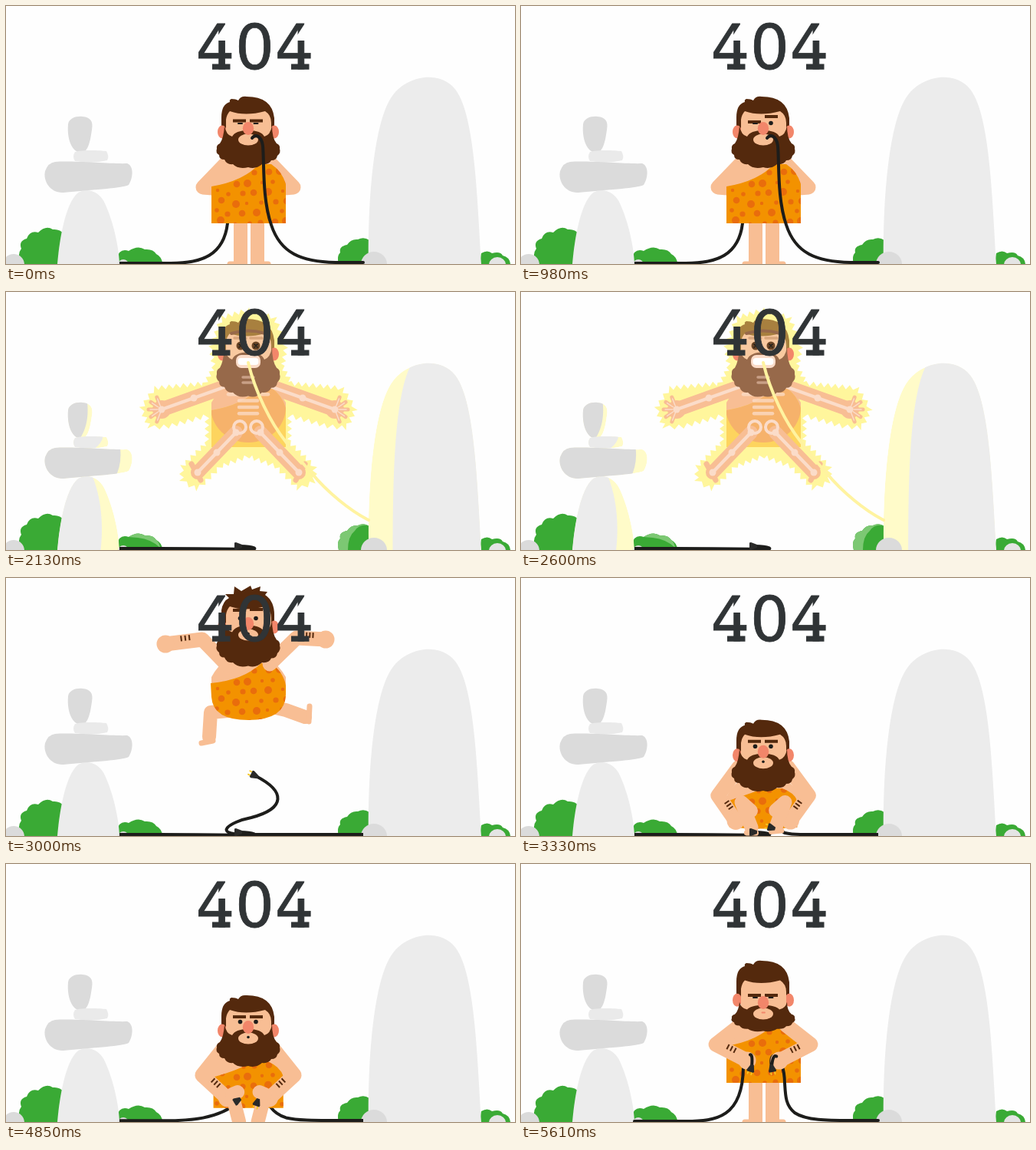
Animation of 664 by 336 pixels, one loop 5720 ms. Source, as an HTML page with a canvas:

```html
<!DOCTYPE html>
<html lang="en">
<head>
<meta charset="utf-8">
<title>404</title>
<style>
  html, body { margin: 0; width: 100%; height: 100%; overflow: hidden; background: #fefefe; }
  canvas, svg { position: absolute; left: 0; top: 0; width: 664px; height: 336px; }
  text { font: 80px "DejaVu Sans", sans-serif; letter-spacing: .7px; }
</style>
</head>
<body>
<canvas width="664" height="336"></canvas>
<svg viewBox="0 0 664 336" fill="#303436">
  <clipPath id="open4">
    <path clip-rule="evenodd" d="M0 0H664V120H0ZM286.500 23H296V45H272.200ZM389.700 23H399V45H375.400Z"/>
  </clipPath>
  <text x="247.500" y="82.400" stroke="#303436" stroke-width=".8" clip-path="url(#open4)">404</text>
  <path d="M269 75.500H292.500V82.800H269ZM372 75.500H395.500V82.800H372Z"/>
</svg>
<script>
const LOOP = 5720;
const ctx = document.querySelector('canvas').getContext('2d');
const SKIN = '#f8be94', HAIR = '#54290d', CORAL = '#f2866a', ORANGE = '#f39200',
      SPOT = '#e96d0c', INK = '#1d1d1b', GLOW = '#fff69c', LIT = '#fffbc9',
      BONE = '#fbdcc9', PALE = '#ececec', GREY = '#dbdbdb', GREEN = '#3aaa35', LEAF = '#7cc873';

// path helpers; every moving path uses absolute coordinate pairs
const pairs = (d, f) => d.replace(/(-?[\d.]+) (-?[\d.]+)/g, (_, x, y) => f(+x, +y).join(' '));
const move = (d, dy) => pairs(d, (x, y) => [x, y + dy]);
const mirror = d => pairs(d, (x, y) => [632 - x, y]);
const points = d => d.match(/-?[\d.]+/g).map(Number);

function mix(a, b, k) {
  if (typeof a === 'number') return a + (b - a) * k;
  const nb = points(b);
  let i = 0;
  return a.replace(/-?[\d.]+/g, n => (+n + (nb[i++] - n) * k).toFixed(2));
}
function span(keys, t) {
  let i = 0;
  while (i < keys.length - 2 && t >= keys[i + 1][0]) i++;
  const [t0, a] = keys[i], [t1, b] = keys[i + 1];
  const k = Math.min(1, Math.max(0, (t - t0) / (t1 - t0)));
  return [a, b, k * k * (3 - 2 * k)];
}
const track = (keys, t) => mix(...span(keys, t));

function fill(d, color) { ctx.fillStyle = color; ctx.fill(new Path2D(d)); }
function line(d, w, color, cap = 'round') {
  ctx.lineWidth = w; ctx.strokeStyle = color; ctx.lineCap = cap; ctx.lineJoin = 'round';
  ctx.stroke(new Path2D(d));
}
function oval(x, y, rx, color, ry = rx) {
  ctx.fillStyle = color; ctx.beginPath(); ctx.ellipse(x, y, rx, ry, 0, 0, 7); ctx.fill();
}
function layer(f) { ctx.save(); f(); ctx.restore(); }

// poses
const TUNIC = 'M268 235Q310 228 330 206L346 206Q360 215 365 232L365 283Q340 283 316 283Q292 283 268 283Z';
const TORSO = 'M268 242L268 225Q284 195 316 195Q348 195 365 225L365 242Z';
function pose(p) {
  return { face: 0, beard: 1, ...p,
    armR: p.armR || mirror(p.armL), legR: p.legR || mirror(p.legL), footR: p.footR || mirror(p.footL) };
}
const LEGS = { legL: 'M306 270L306 300L306 340', footL: 'M311 336L292 336',
  legR: 'M328 270L328 300L328 340', footR: 'M323 336L342 336' };
const stand = pose({ head: 0, body: 0, tunic: TUNIC, armL: 'M286 206L257 236L282 238', ...LEGS });
const shock = pose({ head: -83, body: -81, beard: 1.19, tunic: move(TUNIC, -81),
  armL: 'M290 122L245 138L203 153', legL: 'M300 183L275 209L250 235', footL: 'M242 224L254 245' });
const jump = pose({ head: -100, body: -96, beard: 1.1,
  tunic: 'M267 137Q310 133 333 111L345 111Q362 122 365 140L365 152Q364 185 316 185Q270 185 268 155Z',
  armL: 'M290 115L256 80L208 86', armR: 'M344 112L379 78L417 80',
  legL: 'M300 172L267 175L265 207', footL: 'M270 212L255 215',
  legR: 'M335 165L365 172L390 181', footR: 'M396 167L395 187' });
const sit = pose({ head: 78, body: 70,
  tunic: 'M272 300Q300 290 316 285L340 285Q356 290 360 300L360 336Q340 336 316 336Q292 336 272 336Z',
  armL: 'M284 255L257 297L285 332', legL: 'M300 312L289 300L303 333', footL: 'M296 340L310 340' });
const lift = pose({ head: 8, body: 2, tunic: move(TUNIC, 2), armL: 'M286 210L254 235L295 256', ...LEGS });
const hold = { ...lift, face: 13, beard: .7 };

const POSES = [[0, stand], [1040, stand], [1130, shock], [2630, shock], [2960, jump], [3060, jump],
  [3380, sit], [4710, sit], [5060, lift], [5310, lift], [5590, hold], [LOOP, hold]];

const GROUND_L = 'M148 334L200 334C230 334 270 334 310 335C336 336 322 331 305 331';
const HOLD_L = 'M148 335L215 335C255 335 289 330 290 265C291 246 309 240 301 264';
const STAND_L = 'M148 335L215 335C255 335 284 325 289 283C290 275 290 270 290 262';
const FLY_L = 'M148 334L240 334C290 334 306 315 305 268C304 250 303 238 302.500 228';
const CORD_L = [[0, STAND_L], [1040, STAND_L], [1460, FLY_L], [1540, FLY_L], [2050, GROUND_L],
  [4710, GROUND_L], [5060, HOLD_L], [LOOP, HOLD_L]];

const STAND_R = 'M466 334L430 334C385 333 358 322 346 285C334 250 337 205 335 182C333 168 325 167 321 172';
const SHOCK_R = 'M473 297L471 296C450 285 420 262 398 235C380 215 368 200 365 195C345 170 325 130 316 92';
const WHIP_R = 'M466 334L430 334C380 334 345 334 310 334C270 334 290 318 320 312C365 300 365 278 326 258';
const GROUND_R = 'M466 334L430 334C400 334 385 334 370 334C360 334 352 334 346 334C340 334 336 334 329 333';
const HOLD_R = 'M466 334L430 334C400 334 372 334 357 324C345 314 345 302 344 285C343 245 322 240 327 264';
const CORD_R = [[0, STAND_R], [1040, STAND_R], [1130, SHOCK_R], [2630, SHOCK_R], [2960, WHIP_R],
  [3040, WHIP_R], [3400, GROUND_R], [4710, GROUND_R], [5060, HOLD_R], [LOOP, HOLD_R]];

// scenery: outline, colour, part that stays in shade while lit
const ROCKS = [
  ['M81 154C82 146 92 143 100 144C110 145 114 150 112 161C110 176 107 190 99 191C89 192 79 178 81 154Z', GREY,
    'M70 140L107 140C110 160 107 180 95 195L70 195Z'],
  ['M90 190C100 187 122 188 131 189Q135 196 132 201Q112 206 90 202Q86 196 90 190Z', '#eaeaea',
    'M80 185L128 185Q129 195 116 205L80 205Z'],
  ['M67 336C70 300 78 258 93 244C104 236 120 240 128 255C138 275 147 310 148 336Z', PALE,
    'M50 230L110 230C122 255 130 290 125 336L50 336Z'],
  ['M64 203C85 201 140 206 158 205C167 208 166 224 160 233C150 238 100 240 75 243C58 244 48 228 51 215Q55 204 64 203Z', GREY,
    'M40 200L150 200Q154 225 142 245L40 245Z'],
  ['M473 336C472 250 480 150 504 117C522 92 560 84 582 104C610 130 614 230 620 336Z', PALE,
    'M506 336C506 240 508 125 533 90L640 90L640 336Z']
];
const BUSHES = [
  'M18 336Q15 322 20 316Q16 306 27 303Q31 292 42 295Q52 285 61 291Q70 290 76 297L76 336Z',
  'M140 336L148 321Q153 316 160 319Q172 311 181 317Q192 316 196 323Q204 327 204 336Z',
  'M434 336Q431 326 436 321Q434 313 445 311Q450 303 459 304Q467 300 474 305L474 336Z',
  'M618 336L620 322Q628 317 634 322Q645 319 648 325Q657 327 658 336Z'
];

function scenery(lit, t) {
  BUSHES.forEach(d => fill(d, GREEN));
  if (lit) {
    fill('M160 319Q172 311 181 317Q192 316 196 323Q200 326 201 333Q190 322 172 320Z', LEAF);
    fill(BUSHES[2], LEAF);
    fill('M446 336Q446 318 455 311Q462 301 474 305L474 336Z', GREEN);
  }
  for (const [d, color, shade] of ROCKS) {
    if (!lit) { fill(d, color); continue; }
    layer(() => {
      ctx.clip(new Path2D(d));
      fill(d, LIT);
      ctx.translate(1.5 * Math.sin(t / 90), 0);
      fill(shade, color);
    });
  }
  oval(10, 337, 14, GREY);
  oval(153, 337, 7, GREY);
  oval(480, 336, 17, GREY, 16);
  oval(641, 337, 11, '#e4e4e4', 10);
}

// zigzag halo around the raised figure
const HALF = [[316, 24], [350, 34], [364, 72], [360, 98], [372, 120], [438, 126], [455, 152], [444, 176],
  [420, 174], [369, 160], [369, 196], [402, 228], [402, 246], [382, 256], [352, 226], [316, 213]];
const OUTLINE = HALF.concat(HALF.slice(1, -1).reverse().map(([x, y]) => [632 - x, y]));
function halo(flip) {
  ctx.beginPath();
  OUTLINE.forEach(([x, y], i) => {
    const [nx, ny] = OUTLINE[(i + 1) % OUTLINE.length];
    const len = Math.hypot(nx - x, ny - y), n = 2 * Math.max(1, Math.round(len / 10));
    for (let j = 0; j < n; j++) {
      const k = j / n, out = (j + flip) % 2 ? 4 : -2;
      ctx.lineTo(x + (nx - x) * k + (ny - y) / len * out, y + (ny - y) * k - (nx - x) / len * out);
    }
  });
  ctx.fillStyle = GLOW;
  ctx.fill();
}

function bone(d) {
  line(d, 4.5, BONE);
  const p = points(d);
  for (let i = 0; i < p.length; i += 2) oval(p[i], p[i + 1], 4.5, BONE);
}
function skeleton(p) {
  [p.armL, p.armR, p.legL, p.legR].forEach(bone);
  layer(() => {
    ctx.globalAlpha = .75;
    for (let i = 0; i < 5; i++) {
      const w = i < 2 ? 26 : 12, y = 125 + 8.3 * i;
      line(`M${316 - w} ${y}L${316 + w} ${y}`, 4.5, BONE);
    }
  });
  for (const x of [305, 327]) {
    ctx.beginPath(); ctx.arc(x, 176, 8, 0, 7); ctx.lineWidth = 4; ctx.strokeStyle = BONE; ctx.stroke();
  }
}

function splayed(d, side) {
  const [x, y] = points(d).slice(-2);
  oval(x, y, 12, SKIN);
  for (let i = -2; i <= 2; i++) {
    const a = i * .6, dx = side * Math.cos(a), dy = Math.sin(a);
    line(`M${x} ${y}L${x + dx * 17} ${y + dy * 17}`, 5, SKIN);
    line(`M${x} ${y}L${x + dx * 15} ${y + dy * 15}`, 1.5, BONE);
  }
}

function bands(d) {
  const [, , ex, ey, hx, hy] = points(d);
  const len = Math.hypot(hx - ex, hy - ey), s = hx > ex ? 1 : -1;
  const nx = s * (hy - ey) / len, ny = -s * (hx - ex) / len;
  for (const k of [.34, .45, .56]) {
    const x = ex + (hx - ex) * k, y = ey + (hy - ey) * k;
    line(`M${x + nx} ${y + ny}L${x + nx * 8} ${y + ny * 8}`, 2, HAIR, 'butt');
  }
}

function tunic(p, lit) {
  fill(p.tunic, lit ? '#fdd45e' : ORANGE);
  layer(() => {
    ctx.clip(new Path2D(p.tunic));
    if (lit) return oval(316, 150, 49, '#f6b26b', 46);
    ctx.translate(0, p.body);
    for (let i = 0; i < 36; i++) {
      const r = i / 6 | 0, c = i % 6;
      oval(272 + c * 17 + (r % 2) * 8 + i * 7 % 5, 214 + r * 13 + i * 5 % 6, [5, 2.8, 4.3, 2.2, 3.6][(i * 3 + r) % 5], SPOT);
    }
  });
}

const MANE = 'M281 172L281 145Q281 128 292 125Q291 122 294 121Q300 121 303 123Q306 117 314 118Q347 118 350 146L350 172Z';
const SPIKES = 'M281 172L281 142Q283 130 291 126L286 121L297 121L298 111L307 117L319 110L321 115L332 111L331 117L341 118L338 122Q350 130 350 148L350 172Z';
const FACE = 'M287 185L287 148Q288 141 292 137Q312 144 338 137Q346 142 346 152L346 185Z';
const BEARD = 'M285 156Q284 172 279 179Q274 181 275 186Q273 191 278 194Q278 200 285 200Q288 207 296 206Q303 213 316 210Q326 213 334 206Q343 207 346 201Q353 201 354 195Q359 191 357 186Q358 181 353 179Q347 172 347 156Q345 168 337 170Q333 162 316 162Q299 162 295 170Q287 168 285 156Z';

function mood(t) {
  if (t >= 840 && t < 1060) return { browL: 151, browR: 144, eyeR: 1, mouth: 'bite' };
  if (t < 840) return { browL: 149.5, browR: 149.5, mouth: 'bite' };
  if (t < 3250) return { browL: 142, browR: 141, eyeL: 1, eyeR: 1, mouth: 'o' };
  if (t < 4900) {
    const look = t > 3940 && t < 4480;
    const open = !(look && t % 270 < 50);
    return { browL: 146, browR: 146, eyeL: open, eyeR: open, mouth: 'o',
      dx: look ? 2 * Math.sin((t - 3940) / 540 * Math.PI * 2) : 0 };
  }
  return { browL: 150, browR: 150, mouth: 'flat' };
}

function head(p, t, lit) {
  const m = mood(t);
  ctx.translate(0, p.head);
  const ear = 164 + p.face * .4;
  fill(t > 2640 && t < 3300 ? SPIKES : MANE, lit ? '#a8803f' : HAIR);
  oval(282, ear, 6, CORAL, 8.5);
  oval(350, ear, 6, CORAL, 8.5);
  fill(move(FACE, p.face * .5), lit ? '#f8c9a0' : SKIN);
  layer(() => {
    ctx.translate(0, 165 + p.face);
    ctx.scale(1, p.beard);
    ctx.translate(0, -165);
    fill(BEARD, lit ? '#97694a' : HAIR);
  });
  ctx.translate(0, p.face);
  if (lit) return;
  const chew = t > 240 && t < 800 ? Math.sin((t - 240) / 560 * Math.PI * 8) : 0;
  oval(316, 174 + chew, 13, SKIN, 7.5);
  line(`M296 ${m.browL}L313 ${m.browL}`, 4, HAIR, 'butt');
  line(`M318 ${m.browR}L335 ${m.browR}`, 4, HAIR, 'butt');
  for (const [x, open] of [[305.5, m.eyeL], [326, m.eyeR]]) {
    if (open) oval(x + (m.dx || 0), 152.5, 2.8, INK);
    else line(`M${x - 2.5} 153L${x + 2.5} 153`, 2, INK);
  }
  oval(316, 159.5 + chew * .5, 7.2, CORAL, 8.5);
  if (m.mouth === 'o') oval(316, 172.5, 1.8, INK);
  if (m.mouth === 'flat') line('M314.500 172.500L318 172.500', 1.8, CORAL);
}

function shockedFace() {
  line('M294 54Q316 47 338 54', 4, '#97694a');
  for (const x of [306, 326]) {
    oval(x, 70, 5.5, '#6b4526');
    line(`M${x - 2} 68L${x + 2} 72M${x + 2} 68L${x - 2} 72`, 1.6, INK);
  }
  line('M298 60L313 60M319 60L334 60', 3.5, '#d9a67c');
  ctx.fillStyle = BONE; ctx.beginPath(); ctx.roundRect(300, 82, 32, 17, 7); ctx.fill();
  ctx.fillStyle = '#fff'; ctx.beginPath(); ctx.roundRect(302.5, 86, 27, 9, 4); ctx.fill();
  for (const y of [111, 118]) line(`M309 ${y}L323 ${y}`, 3.5, '#c9a087');
}

function plug(d, sparks) {
  const [cx, cy, x, y] = points(d).slice(-4);
  layer(() => {
    ctx.translate(x, y);
    ctx.rotate(Math.atan2(y - cy, x - cx));
    if (sparks) line('M6 -2.500L10 -2.500M6 2.500L10 2.500', 1.8, '#f6c625');
    fill('M-3 -2L5 -5L7 -4.500L7 4.500L5 5L-3 2Z', '#2a2a29');
  });
}

function legs(p) {
  line(p.legL, 18, SKIN);
  line(p.legR, 18, SKIN);
  line(p.footL, 7, SKIN);
  line(p.footR, 7, SKIN);
}
function arms(p, t, lit) {
  [p.armL, p.armR].forEach((d, i) => {
    line(d, 19, SKIN);
    if (lit) splayed(d, i ? 1 : -1);
    else if (t > 2640) {
      oval(...points(d).slice(-2), 11.5, SKIN);
      bands(d);
    }
  });
}

function draw(t) {
  const lit = t >= 1060 && t < 2640;
  const [a, b, k] = span(POSES, t), p = {};
  for (const key in a) p[key] = mix(a[key], b[key], k);
  const cordL = track(CORD_L, t), cordR = track(CORD_R, t);
  const seated = t > 3280 && t < 4860, free = t > 2640;
  const beat = Math.floor(t / 60) % 2;

  ctx.fillStyle = '#fefefe';
  ctx.fillRect(0, 0, 664, 336);
  scenery(lit, t);
  if (t < 4860) line(cordL, 4, INK, 'butt');
  if (lit) halo(beat);
  if (free && t < 4860) line(cordR, 4, INK, 'butt');

  layer(() => {
    if (lit) ctx.translate(beat ? 0 : 1, 0);
    if (!seated && !lit) legs(p);
    if (!free) arms(p, t, lit);
    fill(move(TORSO, p.body), SKIN);
    tunic(p, lit);
    if (lit) { legs(p); skeleton(p); }
    if (t >= 4860) { line(cordL, 4, INK); line(cordR, 4, INK); }
    if (free) arms(p, t);
    if (seated) legs(p);
    layer(() => head(p, t, lit));
    if (lit) {
      shockedFace();
      line(cordR, 4, '#fff3a0');
    }
  });

  if (t < 1060) line(cordR, 4, INK);
  if (t >= 4860) {
    // cord ends curl over the fists
    for (const d of [cordL, cordR]) {
      const [x0, y0, x1, y1, x2, y2, x3, y3] = points(d).slice(-8);
      const mx = (x0 + 3 * x1 + 3 * x2 + x3) / 8, my = (y0 + 3 * y1 + 3 * y2 + y3) / 8;
      line(`M${mx} ${my}Q${(x1 + 2 * x2 + x3) / 4} ${(y1 + 2 * y2 + y3) / 4} ${x3} ${y3}`, 4, INK);
    }
  }
  if (t > 1130) plug(cordL, t > 4860);
  if (free) plug(cordR, true);
}

const start = performance.now();
function tick() {
  draw((performance.now() - start) % LOOP);
  requestAnimationFrame(tick);
}
tick();
</script>
</body>
</html>
```
